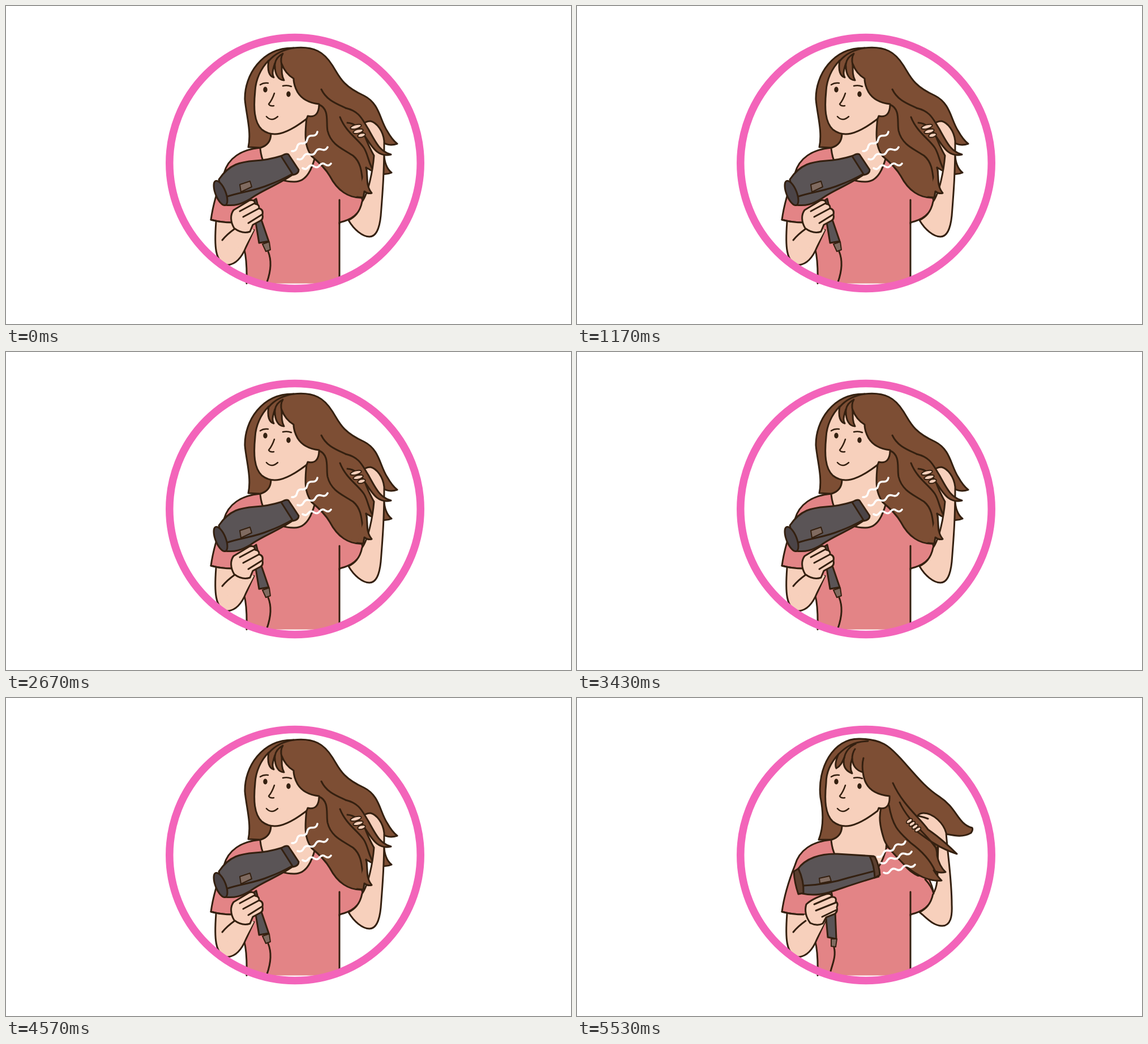
Write an HTML page that moves like this. It is 998 by 561 pixels and loops after 5710 ms.

```html
<!DOCTYPE html>
<html lang="en">
<head>
<meta charset="utf-8">
<title>Drying hair</title>
<style>
html, body { margin: 0; height: 100%; overflow: hidden; background: #fff; }
svg { display: block; width: 100vw; height: 100vh; stroke: #342010; stroke-width: 3; stroke-linecap: round; stroke-linejoin: round; }
.line { fill: none; }
.skin { fill: #f7d0bc; }
.hair { fill: #7d4e34; }
.shirt { fill: #e38486; }
.body { fill: #5a5456; }
.dark { fill: #4b4447; }
.cap { fill: #5c4030; }
.button { fill: #806b60; stroke-width: 2; }
.air { fill: none; stroke: #fff; stroke-width: 3.5; }
.finger { stroke-width: 2; }
.dot { fill: #342010; stroke: none; }
.ring { fill: none; stroke: #f364ba; stroke-width: 13.5; }
</style>
</head>
<body>
<svg viewBox="0 0 998 561">
  <!-- body -->
  <path class="shirt" d="M425 489.5Q426 450 421 430L402 382Q380 382 362 377C365 355 373 325 385 295C392 269 415 253 449 250L546 262L600 288C614 303 627 325 630 345C625 368 610 377 589 382V489.5"/>
  <path class="line" d="M589 342V384"/>
  <path class="skin" d="M468 220C468 240 460 247 449 250C452 290 480 311 510 310C532 310 541 285 546 266L548 240V190"/>
  <path class="skin" d="M371 381C368 420 368 455 392 457C408 455 418 440 424 425L438 395"/>
  <path class="skin" stroke="none" d="M372.5 382H402L438 395L422 425L390 430Z"/>
  <path class="line" d="M362 377Q380 382 400 382M382 413Q390 403 404 393"/>

  <!-- dryer tilted up -->
  <g id="up">
    <path class="hair" d="M428 249C434 222 424 190 422 165C421 122 452 73 508 74C545 70 562 82 576 104C588 122 592 140 632 158C660 172 660 200 673 220Q682 236 691 243C680 247 672 245 660 238L668 262C668 275 673 288 681 294C670 299 655 297 636 285C640 300 634 315 646 330Q639 332 633 327L631 338C605 340 585 325 572 300C565 288 552 275 540 265C525 245 529 220 531 196L480 212L468 225C468 240 460 247 449 250Z"/>
    <path class="line" d="M553 174C572 182 565 205 568 220C574 245 595 252 613 264C630 278 628 300 632 325M557 147C566 166 583 172 600 180M590 196C600 222 622 235 632 250C640 262 640 278 650 292"/>
    <path class="skin" d="M440 150C437 180 438 205 452 218C470 232 492 229 531 199L533 194C546 197 553 190 553 173C535 171 523 165 515 152C509 141 508 134 508 128C498 122 491 113 487 102C487 117 487 124 491 131C481 131 474 120 475 101C470 116 470 121 473 126C465 124 461 114 464 96C450 110 441 130 440 150Z"/>
    <path class="line" d="M508 74C490 77 476 83 464 97M489 84Q477 90 475 102M489 84Q484 92 487 104"/>
    <path class="skin" d="M605 378C615 395 630 407 642 407C655 407 660 390 662 370C666 320 668 290 668 238C666 220 655 206 644 203Q634 203 629 211L636 235Q642 250 650 264C648 290 640 330 629 345C625 365 615 373 605 378Z"/>
    <path class="hair" d="M600 180C625 186 629 200 640 217C655 245 662 257 680 262C655 268 645 245 634 230"/>
    <path class="hair" d="M636 285C640 300 634 315 646 330Q639 332 633 327L631 338L620 337"/>
    <path class="line" d="M603 206Q622 207 635 232"/>
    <g class="skin finger">
      <ellipse cx="618" cy="213" rx="10" ry="3.5" transform="rotate(-15 618 213)"/>
      <ellipse cx="622" cy="221" rx="9" ry="3.5" transform="rotate(-15 622 221)"/>
      <ellipse cx="628" cy="228" rx="7" ry="3.5" transform="rotate(-15 628 228)"/>
    </g>
    <path class="body" d="M435 345L447 418L464 415L450 374L442 340Z"/>
    <path class="button" d="M453 420L465 416L467 430L459 433Z"/>
    <path class="line" d="M463 433C470 450 467 470 461 487"/>
    <path class="body" d="M376 306C395 278 415 275 440 273C460 272 475 268 488 264L507 297C480 316 450 326 432 340C415 350 405 353 386 351Z"/>
    <path class="line" d="M391 336C415 328 440 326 463 316Q485 308 506 296"/>
    <path class="dark" d="M486 265Q495 259 499 262L517 289Q517 296 507 298Z"/>
    <ellipse class="dark" cx="379" cy="330" rx="9" ry="23" transform="rotate(-22 379 330)"/>
    <path class="button" d="M413 315L431 309L434 319L415 328Z"/>
    <path class="skin" d="M403 392C396 380 396 368 402 360L430 343Q440 341 440 349Q448 350 447 357Q455 359 453 368Q455 376 449 379L436 386L431 398Q418 403 403 392"/>
    <path class="line" d="M413 362L439 348M419 372L447 357M428 383L452 368"/>
    <path class="air" d="M505 256q7.5 .6 9-6.8t9-6.8t9-6.8t9-6.8t9-6.8M515 270q7.2 2.5 10.6-4.2t10.6-4.2t10.6-4.2t10.6-4.2t10.6-4.2M524 286q5.8 4.2 10-1.6t10-1.6t10-1.6t10-1.6t10-1.6"/>
  </g>

  <!-- dryer level -->
  <g id="level">
    <path class="hair" d="M427 250C437 225 434 195 430 175C424 125 452 70 500 72C545 73 555 90 572 107C600 138 615 158 640 174C672 195 672 222 698 229Q700 233 696 238C682 246 668 243 652 240L636 265C632 280 640 298 651 307Q640 310 632 304Q636 313 644 322C610 322 590 310 577 293C560 275 545 262 541 245C535 225 533 210 537 194L480 212L468 225C468 240 460 247 449 250Z"/>
    <path class="skin" d="M440 150C440 130 449 113 462 99C457 110 455 118 458 124C466 120 469 112 472 105C469 118 473 128 486 133C482 125 483 115 486 107C487 120 494 128 505 131C506 138 508 146 511 151C518 164 533 171 552 173C553 190 546 197 533 194L531 199C492 229 470 232 452 218C438 205 437 180 440 150Z"/>
    <path class="line" d="M514 76C488 77 475 86 462 99M492 81Q475 89 472 106M491 90Q486 97 486 108M506 106Q503 117 505 131"/>
    <path class="skin" d="M605 378C615 385 628 402 645 402C660 402 663 385 662 365C662 320 655 280 652 238C648 222 630 203 612 203Q604 203 600 210L605 232Q628 242 638 262C636 300 640 330 629 345C625 365 615 373 605 378Z"/>
    <path class="shirt" stroke="none" d="M600 315H617Q627 330 629 345L600 350Z"/>
    <path class="line" d="M615 320Q627 333 630 345"/>
    <path class="hair" d="M605 235C637 257 636 270 636 278Q640 297 651 307Q640 310 630 304Q637 315 644 322C620 324 600 312 582 298"/>
    <path class="hair" d="M558 150C575 188 604 210 620 232Q645 249 671 275C640 265 620 250 600 235"/>
    <path class="line" d="M551 189C558 230 570 237 590 256Q620 278 632 304M570 184C585 218 615 237 632 262M603 208Q612 210 620 213"/>
    <g class="skin finger">
      <ellipse cx="587" cy="217" rx="6" ry="3" transform="rotate(-35 587 217)"/>
      <ellipse cx="592" cy="222" rx="6" ry="3" transform="rotate(-35 592 222)"/>
      <ellipse cx="597" cy="227" rx="6" ry="3" transform="rotate(-35 597 227)"/>
      <ellipse cx="602" cy="232" rx="6" ry="3" transform="rotate(-35 602 232)"/>
    </g>
    <path class="body" d="M436 345L443 422L458 425L456 376L449 340Z"/>
    <path class="button" d="M449 425H459L457 439L449 438Z"/>
    <path class="line" d="M454 440C458 455 451 470 448 482"/>
    <path class="body" d="M390 302C403 283 430 274 460 275L524 279L533 315C500 324 470 335 445 343Q420 350 398 345Z"/>
    <path class="line" d="M400 331C430 330 455 325 480 317L530 304"/>
    <path class="cap" d="M517 279L526 280Q534 295 535 312L526 317Q525 295 517 279Z"/>
    <path class="cap" d="M383 306L391 301Q401 322 400 344L391 346Q384 326 383 306Z"/>
    <path class="button" d="M428 318L446 314L449 323L429 327Z"/>
    <path class="skin" d="M412 397C404 386 402 374 405 364Q415 354 440 346Q450 344 450 351Q459 350 457 359Q462 362 459 369Q461 377 455 381L440 387L434 398Q424 403 412 397"/>
    <path class="line" d="M419 364L449 351M422 375L457 361M433 386L458 374"/>
    <path class="air" d="M531 280q7.3 1.7 9.8-5.4t9.8-5.4t9.8-5.4t9.8-5.4t9.8-5.4M537 291q7.2 2.7 10.8-4t10.8-4t10.8-4t10.8-4t10.8-4M542 308q6.7 3.5 11-2.8t11-2.8t11-2.8t11-2.8t11-2.8"/>
  </g>

  <!-- face -->
  <ellipse class="dot" cx="458" cy="147.5" rx="3.7" ry="5"/>
  <ellipse class="dot" cx="499" cy="155.5" rx="3.7" ry="5"/>
  <path class="line" stroke-width="2.5" d="M449 139Q455 135 463 136M489 141Q497 139 504 142M474 154Q470 166 464 173Q466 177 473 176M460 195Q469 205 480 195"/>

  <ellipse class="ring" cx="510.5" cy="277" rx="221.7" ry="221.5"/>
</svg>
<script>
const LOOP = 5710, FPS = 30, HOLD = 5.705;
const up = document.getElementById('up'), level = document.getElementById('level');
const start = performance.now();

// Two poses alternate; each change falls on a tick of the 30 fps clock.
function draw() {
  const t = (performance.now() - start) % LOOP;
  const tick = Math.floor((t + 4) * FPS / 1000);
  const isLevel = Math.floor(tick / HOLD) % 2 === 1;
  up.style.display = isLevel ? 'none' : '';
  level.style.display = isLevel ? '' : 'none';
  requestAnimationFrame(draw);
}
draw();
</script>
</body>
</html>
```
